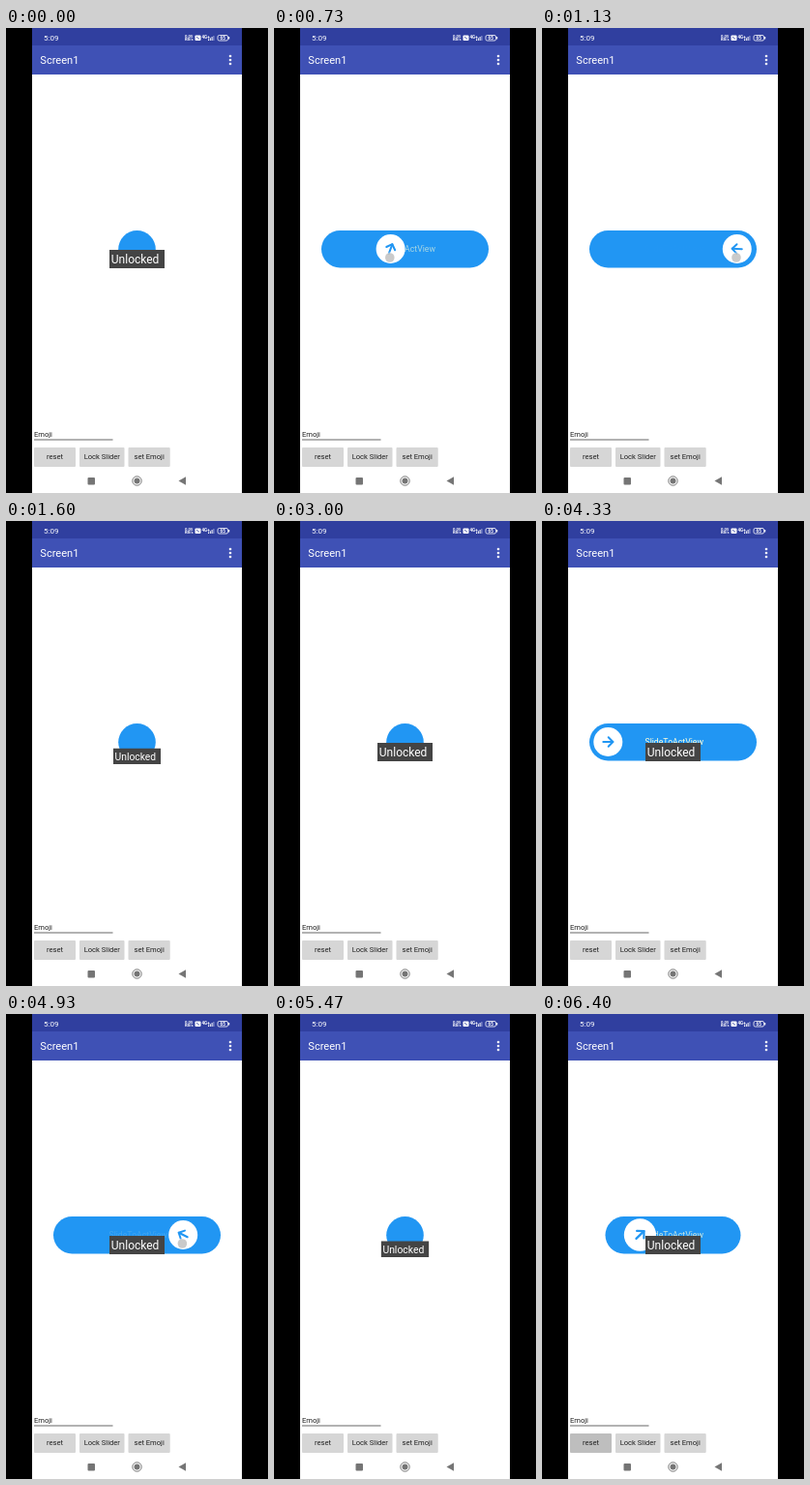
An HTML page with a canvas that plays this animation: 271x480 px, repeating every 6.47 s.

```html
<!DOCTYPE html>
<html lang="en">
<head>
<meta charset="utf-8">
<title>Slide to unlock</title>
<style>
html, body { margin: 0; width: 100%; height: 100%; overflow: hidden; background: #000; }
canvas { display: block; width: 271px; height: 480px; }
</style>
</head>
<body>
<canvas></canvas>
<script>
const LOOP = 6470, BLUE = '#2196f3', TRAVEL = 135, MID = 135.5, ROW = 228;
const canvas = document.querySelector('canvas');
const c = canvas.getContext('2d');
const dpr = window.devicePixelRatio || 1;
canvas.width = 271 * dpr;
canvas.height = 480 * dpr;

const ramp = (t, from, to) => Math.min(1, Math.max(0, (t - from) / (to - from)));
const smooth = u => u * u * (3 - 2 * u);
const sine = u => (1 - Math.cos(Math.PI * u)) / 2;
const easeOut = u => 1 - (1 - u) ** 2;
const overshoot = u => 1 + (u - 1) ** 2 * (3 * (u - 1) + 2);

function box(x, y, w, h, fill, r = 0) {
  c.fillStyle = fill;
  c.beginPath();
  c.roundRect(x, y, w, h, r);
  c.fill();
}
function disc(x, y, r, fill) {
  c.fillStyle = fill;
  c.beginPath();
  c.arc(x, y, r, 0, 7);
  c.fill();
}
function stroke(points, width, color) {
  c.lineWidth = width;
  c.strokeStyle = color;
  c.beginPath();
  points.forEach(([x, y], i) => i ? c.lineTo(x, y) : c.moveTo(x, y));
  c.stroke();
}
function label(text, x, y, size, fill, align = 'left', weight = 400) {
  c.font = `${weight} ${size}px Roboto, sans-serif`;
  c.textAlign = align;
  c.fillStyle = fill;
  c.fillText(text, x, y);
}

function statusBar() {
  box(27, 0, 217, 18, '#303f9f');
  label('5:09', 39, 13, 8, '#fff');
  label('0.05', 185, 9.8, 4.2, '#fff', 'left', 700);
  label('KB/s', 185, 13.2, 4, '#fff', 'left', 700);
  box(195.5, 7.5, 6, 5.5, '#fff', 1);
  stroke([[197, 9], [200, 11.5]], 0.8, '#303f9f');
  label('4G+', 202.5, 10.5, 4.5, '#fff', 'left', 700);
  for (let i = 0; i < 4; i++)
    box(209 + i * 1.8, 11.5 - i * 1.2, 1, 1.5 + i * 1.2, i < 3 ? '#fff' : '#9fa8da');
  c.lineWidth = 0.8;
  c.strokeStyle = '#fff';
  c.beginPath();
  c.roundRect(219, 7.5, 10.5, 5.5, 1.5);
  c.stroke();
  box(230, 9, 1.2, 2.5, '#fff');
  label('65', 224.2, 12, 4.5, '#fff', 'center', 700);
}

function screen(pressed) {
  box(0, 0, 271, 480, '#000');
  box(27, 0, 217, 480, '#fff');
  box(27, 18, 217, 30, '#3f51b5');
  statusBar();
  label('Screen1', 35.3, 37, 11.1, '#fff');
  for (const y of [29, 33, 37]) disc(232, y, 1.3, '#fff');

  label('Emoji', 29, 421.5, 7.6, '#222');
  box(29, 424.5, 81.5, 1, '#666');
  const shade = 214 - 24 * pressed;
  const buttons = [['reset', 29, 43], ['Lock Slider', 76, 46.5], ['set Emoji', 126.5, 43.2]];
  buttons.forEach(([text, x, w], i) => {
    const g = i ? 214 : shade;
    box(x, 433, w, 20, `rgb(${g},${g},${g})`, 1);
    label(text, x + w / 2, 445.2, 7.6, '#222', 'center');
  });

  box(84.5, 464, 7.5, 7.5, '#757575', 1);
  disc(MID, 467.5, 3, '#757575');
  c.lineWidth = 1;
  c.strokeStyle = '#757575';
  c.beginPath();
  c.arc(MID, 467.5, 4.7, 0, 7);
  c.stroke();
  c.fillStyle = '#757575';
  c.beginPath();
  c.moveTo(178.5, 467.5);
  c.lineTo(186, 463.3);
  c.lineTo(186, 471.7);
  c.fill();
}

// shut: 0 full bar, 1 circle; pos: thumb travel 0..1; r: thumb radius
const opening = u => ({ shut: 1 - sine(u), pos: 1 - sine(u), r: 15 * overshoot(u) });
const dragged = u => ({ shut: 0, pos: smooth(u), r: 15 });
const closing = u => ({ shut: sine(u), pos: 1, r: Math.max(0, 15 * (1 - 1.7 * u)) });

function sliderAt(t) {
  if (t < 70) return closing(1);
  if (t < 400) return opening(ramp(t, -100, 200));
  if (t < 1230) return dragged(ramp(t, 400, 1180));
  if (t < 3400) return closing(ramp(t, 1230, 1530));
  if (t < 4530) return opening(ramp(t, 3400, 3700));
  if (t < 5100) return dragged(ramp(t, 4530, 5060));
  if (t < 6200) return closing(ramp(t, 5100, 5400));
  return opening(ramp(t, 6200, 6500));
}

function slider({ shut, pos, r }) {
  const half = 86.5 - 67.2 * shut, x = 68.3 + TRAVEL * pos;
  c.save();
  box(MID - half, 209, 2 * half, 38.5, BLUE, 19.25);
  c.clip();
  c.globalAlpha = 1 - pos;
  label('SlideToActView', 136.7, 231.2, 8.7, '#ffffd8', 'center');
  c.globalAlpha = 1;
  if (r > 0.2) {
    disc(x, ROW, r, '#fff');
    c.translate(x, ROW);
    c.rotate(-Math.PI * pos);
    c.scale(r / 15, r / 15);
    c.lineCap = c.lineJoin = 'round';
    stroke([[-5, 0], [5, 0]], 2, BLUE);
    stroke([[0.4, -4.7], [5.1, 0], [0.4, 4.7]], 2, BLUE);
  }
  c.restore();
}

function finger(t, { pos }) {
  if (!(t >= 400 && t < 1230 || t >= 4530 && t < 5100)) return;
  const x = 67.5 + TRAVEL * pos;
  disc(x, 237, 5.5, 'rgba(255,255,255,.6)');
  disc(x, 237, 4.8, 'rgba(150,150,150,.5)');
}

function toast(t) {
  let grow, alpha = 1;
  if (t < 1530) {
    grow = 1 - ramp(t, 400, 600) ** 2;
    alpha = 1 - ramp(t, 430, 600);
  } else if (t < 5395) {
    const u = ramp(t, 1530, 1880);
    grow = easeOut(u);
    alpha = Math.min(1, u * 6) * (1 - ramp(t, 5000, 5200));
  } else {
    const u = ramp(t, 5395, 5745);
    grow = easeOut(u);
    alpha = Math.min(1, u * 6);
  }
  if (alpha <= 0) return;
  c.save();
  c.globalAlpha = alpha;
  c.translate(MID, 238.5 + 7 * (1 - grow));
  const k = 0.78 + 0.22 * grow;
  c.scale(k, k);
  box(-28.5, -9.5, 57, 19, '#444');
  label('Unlocked', -26.7, 4.5, 12, '#fff');
  c.restore();
}

function frame(now) {
  const t = now % LOOP;
  const pressed = ramp(t, 3200, 3330) - ramp(t, 3600, 3800) + ramp(t, 6000, 6130);
  const state = sliderAt(t);
  c.setTransform(dpr, 0, 0, dpr, 0, 0);
  screen(pressed);
  slider(state);
  finger(t, state);
  toast(t);
  requestAnimationFrame(() => frame(performance.now() - start));
}
const start = performance.now();
frame(0);
</script>
</body>
</html>
```
